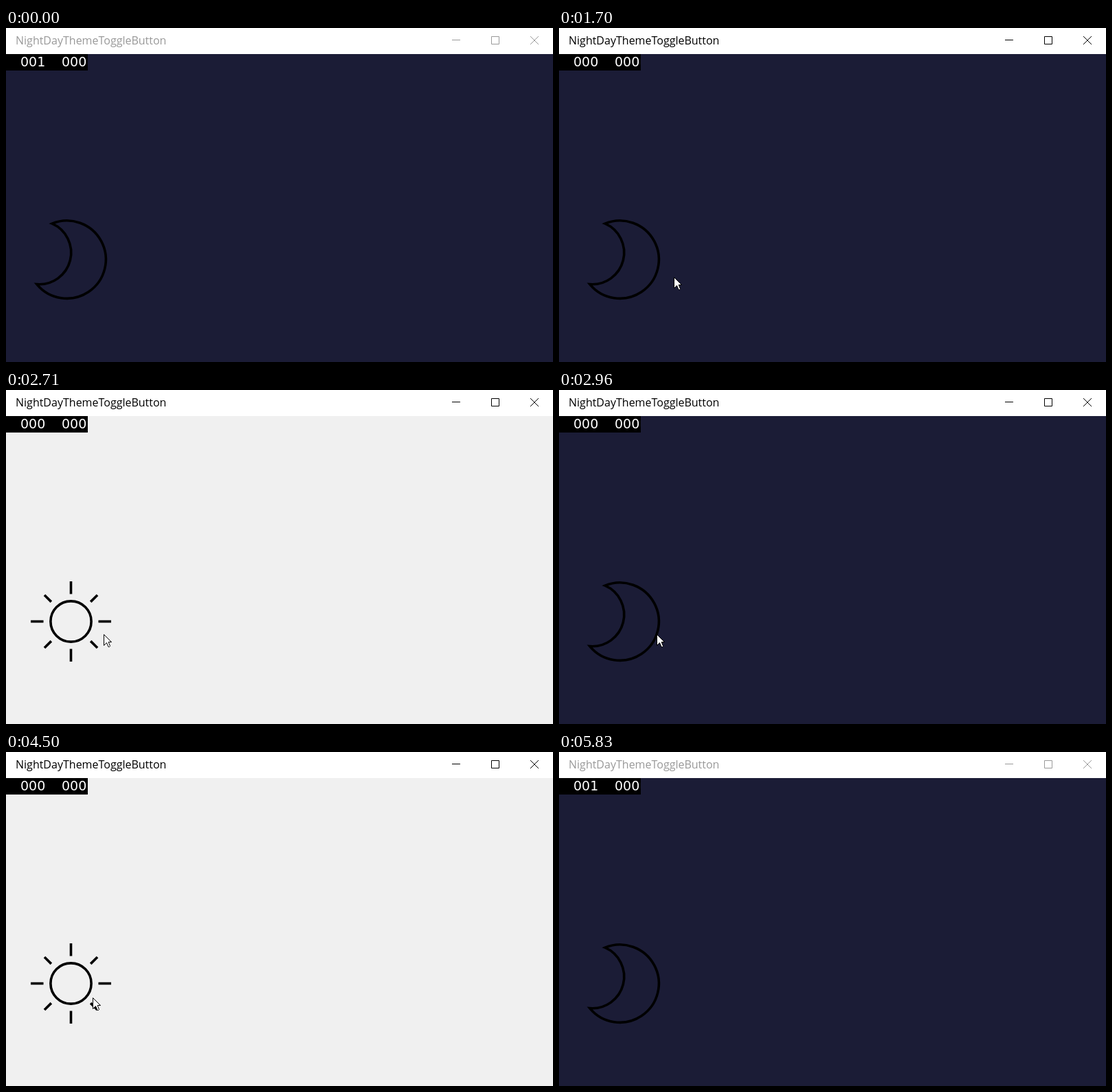
An HTML page for the animation above (5.92 s loop, 796 px wide and 487 px high).

```html
<!DOCTYPE html>
<html lang="en">
<head>
<meta charset="utf-8">
<title>NightDayThemeToggleButton</title>
<style>
  html, body { margin: 0; width: 100%; height: 100%; overflow: hidden; }
  svg { display: block; width: 796px; height: 487px; }
  .line { fill: none; stroke: #000; stroke-width: 3.6; }
  .title { font: 16px "Open Sans", sans-serif; fill: currentColor; }
  .counter { font: 19px "DejaVu Sans", sans-serif; fill: #fff; }
</style>
</head>
<body>
<svg viewBox="0 0 796 487">
  <rect id="page" y="38" width="796" height="449"/>
  <rect width="796" height="38" fill="#fff"/>
  <g id="bar">
    <text class="title" x="14" y="24">NightDayThemeToggleButton</text>
    <path d="M649 17.5h12M706.5 12.5h11v11h-11zM763 12l12 12M775 12l-12 12" fill="none" stroke="currentColor"/>
  </g>
  <rect y="38" width="119" height="24"/>
  <text id="count" class="counter" x="21" y="56"></text>
  <text class="counter" x="81" y="56">000</text>
  <path id="moon" class="line" d="M67 285.2A56.7 56.7 0 1 1 44.8 373.6A46.2 46.2 0 0 0 67 285.2Z"/>
  <g id="sun" class="line" transform="translate(94.5 337.5)">
    <circle r="29.6"/>
  </g>
  <path id="cursor" d="M.5 .5V16.5L4.5 12.5L7 18.5H8.5L9.5 17.5L7.2 11.5H11.5Z" fill="#fff" stroke="#000"/>
</svg>
<script>
const LOOP = 5920;
const STEP = 78; // pointer refresh interval
const $ = id => document.getElementById(id);
const [page, bar, count, moon, sun, cursor] =
  ["page", "bar", "count", "moon", "sun", "cursor"].map($);

for (let i = 0; i < 8; i++) {
  const ray = document.createElementNS("http://www.w3.org/2000/svg", "path");
  ray.setAttribute("d", i % 2 ? "M40.5 0H54.5" : "M40 0H58.5");
  ray.setAttribute("transform", `rotate(${i * 45})`);
  sun.append(ray);
}

// Each glide continues from the previous one; swing is an excursion to the right and back
const entry = [475, 457];
const glides = [
  { start: 210, end: 760, to: [221, 371] },
  { start: 1070, end: 1700, to: [167, 363] },
  { start: 1920, end: 2710, to: [142, 356], swing: 114 },
  { start: 2960, end: 3490, to: [134, 352], swing: 80 },
  { start: 3720, end: 4500, to: [126, 358], swing: 59 },
  { start: 4730, end: 5520, to: [762, 508], bend: 5 }
];

function pointerAt(t) {
  const i = glides.findLastIndex(g => t >= g.start);
  const { start, end, to, swing = 0, bend = 1 } = glides[i];
  const from = i ? glides[i - 1].to : entry;
  const steps = Math.round((end - start) / STEP);
  const u = Math.min(1, Math.floor((t - start) / (end - start) * steps + 0.15) / steps);
  const aside = swing * Math.sin(Math.PI * u) ** 2;
  const x = from[0] + (to[0] - from[0]) * u + aside;
  const y = from[1] + (to[1] - from[1]) * u ** bend + aside / 12;
  return [Math.round(x), Math.round(y)];
}

const show = (element, visible) => element.style.display = visible ? "" : "none";

function draw(t) {
  const light = t >= 1850 && t < 2960 || t >= 3720 && t < 4730;
  const pointing = t >= 210 && t < 5520;
  page.setAttribute("fill", light ? "#f0f0f0" : "#1b1c36");
  bar.style.color = t >= 840 && t < 5830 ? "#000" : "#999";
  count.textContent = t < 920 || t >= 4730 ? "001" : "000";
  show(sun, light);
  show(moon, !light);
  show(cursor, pointing);
  if (pointing) cursor.setAttribute("transform", `translate(${pointerAt(t)})`);
}

const begin = performance.now();
function tick() {
  draw((performance.now() - begin) % LOOP);
  requestAnimationFrame(tick);
}
tick();
</script>
</body>
</html>
```
